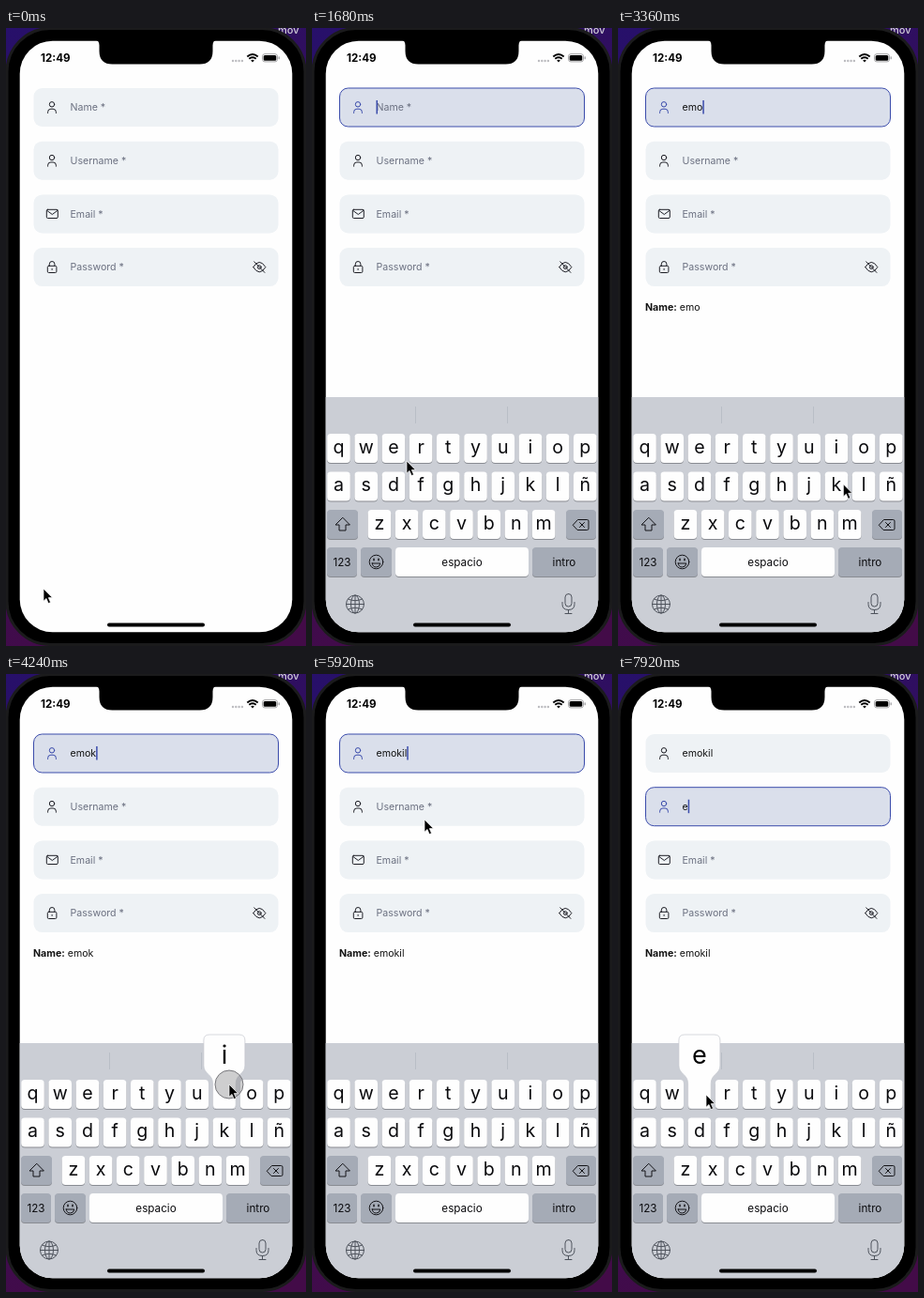
These frames come from a looping animation (320x658 px, 8000 ms). An HTML page:

```html
<!DOCTYPE html>
<html lang="en">
<head>
<meta charset="utf-8">
<title>Sign-up form</title>
<style>
html, body { margin: 0; width: 100%; height: 100%; overflow: hidden; background: #000; }
svg { display: block; width: 320px; height: 658px; font-family: Inter, Roboto, sans-serif; }
text { white-space: pre; }
.mid { text-anchor: middle; }
.line { fill: none; stroke: currentColor; stroke-width: 1; stroke-linecap: round; stroke-linejoin: round; }
.field text { font-size: 10.6px; }
.letter { font-size: 19.6px; fill: #0b0b0e; }
.word { font-size: 11.7px; fill: #0b0b0e; }
</style>
</head>
<body>
<svg viewBox="0 0 320 658">
  <defs>
    <linearGradient id="desk" x2="0.300" y2="1">
      <stop offset="0" stop-color="#27106a"/>
      <stop offset="1" stop-color="#430b48"/>
    </linearGradient>
    <clipPath id="screen"><rect x="14.700" y="13.700" width="290.600" height="629.600" rx="35"/></clipPath>
  </defs>
  <rect width="320" height="658" fill="url(#desk)"/>
  <text x="290" y="5.800" font-size="11" font-weight="500" fill="#d4d2da">mov</text>
  <rect x="1" y="0.500" width="318" height="656" rx="46" fill="#000" stroke="#1b1b1c" stroke-width="3"/>
  <g clip-path="url(#screen)">
    <rect x="14" y="13" width="292" height="631" fill="#fefefe"/>
    <g id="form"></g>
    <text id="label" x="29" y="300.500" font-size="10.600" fill="#111"><tspan font-weight="700">Name:</tspan><tspan id="value"></tspan></text>
    <g id="board"></g>
    <rect x="108" y="633.500" width="104" height="4" rx="2"/>
  </g>
  <path d="M94 12.500q5.500 0 5.500 6v6q0 14 14 14h93q14 0 14-14v-6q0-6 5.500-6z"/>
  <text x="37" y="36.200" font-size="11.600" font-weight="650">12:49</text>
  <g fill="#bcbcc0">
    <circle cx="242" cy="35" r="1.200"/><circle cx="245.300" cy="35" r="1.200"/>
    <circle cx="248.600" cy="35" r="1.200"/><circle cx="251.900" cy="35" r="1.200"/>
  </g>
  <g fill="none" stroke="#000" stroke-width="1.900">
    <path d="M257.300 30.400q5.700-4.700 11.400 0M259.300 32.800q3.700-3 7.400 0"/>
    <path d="M261.200 34.400q1.800-1.200 3.600 0l-1.800 2z" fill="#000" stroke="none"/>
  </g>
  <rect x="273.500" y="27.700" width="16" height="8.200" rx="2.500" fill="none" stroke="#9b9b9e" stroke-width=".9"/>
  <rect x="274.700" y="28.900" width="13.600" height="5.800" rx="1.500"/>
  <rect x="290.600" y="30.300" width="1.200" height="3" rx=".6" fill="#9b9b9e"/>
  <g id="pop">
    <path d="M-22-42q0-6 6-6h32q6 0 6 6v27c0 9-9.700 9-9.700 19v23q0 4-4 4h-16.600q-4 0-4-4v-23c0-10-9.700-10-9.700-19z"
      fill="#fefefe" stroke="#c4c8cf" stroke-width=".7"/>
    <text id="big" class="mid" y="-17" font-size="27"></text>
  </g>
  <g id="pointer">
    <circle id="touch" r="15" fill="#808084" fill-opacity=".38" stroke="#77777b" stroke-width="1"/>
    <path d="M0 0v13.200l3-2.800 2.200 5.200 2.300-1-2.200-5h4.200z" fill="#000" stroke="#fff" stroke-width=".7"/>
  </g>
</svg>
<script>
const $ = id => document.getElementById(id);
const NAME = 'emokil';
const BLUE = '#3b4cab';

const user = '<circle cx="49" cy="-3.200" r="2.700"/><path d="M44.600 6v-1q0-3.300 3.300-3.300h2.200q3.300 0 3.300 3.300v1"/>';
const mail = '<rect x="43.300" y="-4.600" width="12" height="9.200" rx="1.300"/><path d="M43.600-3.600l5.700 4.200 5.700-4.200"/>';
const lock = '<rect x="44.300" y="-1.300" width="9.600" height="7.200" rx="1.300"/><path d="M46.300-1.300v-2q0-2.800 2.800-2.800t2.800 2.800v2M49.100 1.800v1"/>';
const eye = '<path d="M263.700 0q6.600-10.500 13.200 0-6.600 10.500-13.200 0M264.700-5.800l11.200 11.600"/><circle cx="270.300" cy="0" r="1.900"/>';

const fields = [['Name *', user], ['Username *', user], ['Email *', mail], ['Password *', lock + eye]];

$('form').innerHTML = fields.map(([, icon], i) => `
  <g class="field" transform="translate(0 ${84.5 + 56.7 * i})">
    <rect class="box" x="29.500" y="-20.500" width="261" height="41" rx="9"/>
    <g class="line">${icon}</g>
    <text x="68.500" y="3.700"></text>
    <rect class="caret" y="-7.500" width="1.500" height="14.500" fill="${BLUE}"/>
  </g>`).join('');

// Keyboard
const COL = 29.2;
const GREY = '#a5abb6';
const keys = {};
const key = (x, y, w, fill = '#fefefe') =>
  `<rect x="${x}" y="${y + 1}" width="${w}" height="31" rx="4" fill="#898c92"/>
   <rect x="${x}" y="${y}" width="${w}" height="31" rx="4" fill="${fill}"/>`;

function row(chars, left, y) {
  return [...chars].map((c, i) => {
    const x = left + COL * i;
    keys[c] = [x, y];
    return key(x - 12.3, y, 24.6) + `<text class="letter mid" x="${x}" y="${y + 20.8}">${c}</text>`;
  }).join('');
}

const word = (s, x) => `<text class="word mid" x="${x}" y="572.500">${s}</text>`;

$('board').innerHTML = `
  <rect x="14" y="393" width="292" height="260" fill="#cbced5"/>
  <path d="M110.500 403v18M208.500 403v18" stroke="#b9bec6"/>
  ${row('qwertyuiop', 28.5, 432)}
  ${row('asdfghjklñ', 28.5, 472.5)}
  ${row('zxcvbnm', 71.9, 513)}
  ${key(16, 513, 33, GREY)}${key(271, 513, 32, GREY)}
  ${key(16, 553, 32, GREY)}${key(52, 553, 33, GREY)}${key(89, 553, 142)}${key(235, 553, 68, GREY)}
  ${word('123', 32)}${word('espacio', 160)}${word('intro', 269)}
  <g class="line" color="#141418">
    <path d="M32.500 521.500l-7.500 7.500h4v6h7v-6h4z"/>
    <path d="M278.500 529l5-5.500h10q1.500 0 1.500 1.500v8q0 1.500-1.500 1.500h-10zM285.500 526.500l5 5m0-5l-5 5"/>
    <circle cx="68.500" cy="568.500" r="7.300"/>
    <path d="M64.200 570h8.600q-.5 4-4.300 4t-4.300-4z"/>
    <path d="M66 565.200v1.500M71 565.200v1.500" stroke-width="1.500"/>
  </g>
  <g class="line" color="#4e535c">
    <circle cx="46" cy="613.500" r="9.500"/><ellipse cx="46" cy="613.500" rx="4.500" ry="9.500"/>
    <path d="M46 604v19M36.500 613.500h19M38.500 608q7.500 3.500 15 0M38.500 619q7.500-3.500 15 0"/>
    <rect x="270" y="602.500" width="7" height="13.500" rx="3.500"/>
    <path d="M267 611.500v2q0 6 6.500 6t6.500-6v-2M273.500 619.500v4M270 623.500h7"/>
  </g>`;

// Pointer path: time, x, y
const path = [
  [0, 40, 597], [600, 87, 97], [1040, 87, 97], [1600, 101, 461], [2080, 101, 461],
  [2480, 246, 536], [2640, 246, 536], [2960, 264, 452], [3120, 264, 452],
  [3440, 236, 492], [3680, 236, 492], [4000, 238, 437], [4320, 238, 437],
  [4720, 264, 490], [4960, 264, 490], [5760, 120, 155], [6560, 120, 155],
  [7600, 94, 448], [8000, 94, 448]
];

// Key, pressed, released
const presses = [
  ['e', 1840, 2000], ['m', 2480, 2560], ['o', 2960, 3120], ['k', 3520, 3600],
  ['i', 4160, 4320], ['l', 4800, 4880], ['e', 7760, 7920]
];
const taps = [[640, 720], [6240, 6320]];
const LINGER = 80;

function pointerAt(t) {
  const i = path.findIndex(p => p[0] > t);
  const [t0, x0, y0] = path[i - 1], [t1, x1, y1] = path[i];
  const u = (t - t0) / (t1 - t0), k = u * u * (3 - 2 * u);
  return [x0 + (x1 - x0) * k, y0 + (y1 - y0) * k];
}

const typed = t => presses.filter(p => p[2] <= t).length;
const rows = [...document.querySelectorAll('.field')].map(g => ({
  box: g.querySelector('.box'), icon: g.querySelector('.line'),
  text: g.querySelector('text'), caret: g.querySelector('.caret')
}));

function draw(t) {
  const n = typed(t);
  const texts = [NAME.slice(0, n), n > NAME.length ? 'e' : '', '', ''];
  const focus = taps.filter(p => p[1] <= t).length - 1;

  rows.forEach((r, i) => {
    const on = i === focus;
    r.box.setAttribute('fill', on ? '#dadfeb' : '#eef2f5');
    r.box.setAttribute('stroke', on ? BLUE : 'none');
    r.icon.setAttribute('color', on ? BLUE : '#1e1f26');
    r.text.textContent = texts[i] || fields[i][0];
    r.text.setAttribute('fill', texts[i] ? '#111' : '#6b7080');
    r.caret.style.display = on ? '' : 'none';
    if (on) r.caret.setAttribute('x', 68.5 + (texts[i] ? r.text.getComputedTextLength() : 0));
  });

  // The label follows the field one step later
  const shown = NAME.slice(0, typed(t - STEP));
  $('label').style.display = shown ? '' : 'none';
  $('value').textContent = ' ' + shown;

  const drop = t < 720 ? 270 : t > 1500 ? 0 : 265 * Math.exp((720 - t) / 176);
  $('board').setAttribute('transform', `translate(0 ${drop.toFixed(1)})`);

  const hit = presses.find(p => t >= p[1] && t < p[2] + LINGER);
  $('pop').style.display = hit ? '' : 'none';
  if (hit) {
    $('big').textContent = hit[0];
    $('pop').setAttribute('transform', `translate(${keys[hit[0]]})`);
  }

  const down = taps.some(p => t >= p[0] && t < p[1]) || presses.some(p => t >= p[1] && t < p[2]);
  $('touch').style.display = down ? '' : 'none';
  $('pointer').setAttribute('transform', `translate(${pointerAt(t)})`);
}

const STEP = 80, LOOP = 8000;
const start = performance.now();
function tick() {
  const t = Math.max(0, performance.now() - start) % LOOP;
  draw(Math.floor(t / STEP) * STEP);
  requestAnimationFrame(tick);
}
tick();
</script>
</body>
</html>
```
